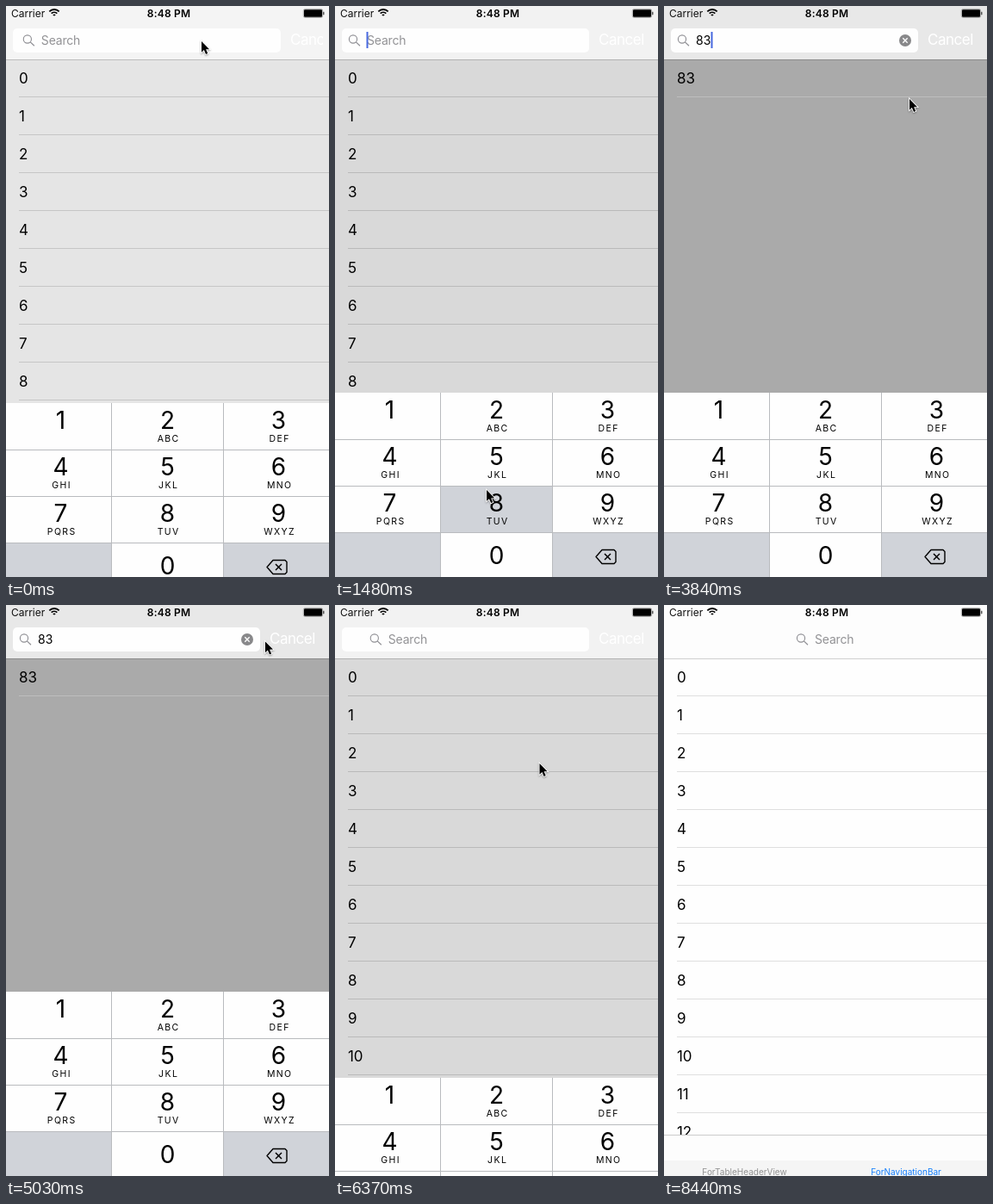
An HTML page with a canvas for the animation above (9.04 s loop, 375 by 663 pixels).

```html
<!DOCTYPE html>
<html lang="en">
<head>
<meta charset="utf-8">
<title>Number search</title>
<style>
html, body { margin: 0; width: 100%; height: 100%; overflow: hidden; background: #fff; }
canvas { display: block; width: 375px; height: 663px; }
</style>
</head>
<body>
<canvas id="stage"></canvas>
<script>
const W = 375, H = 663, LOOP = 9040, STEP = 150, ROW = 44, KEY = 54;
const canvas = document.getElementById('stage');
const ctx = canvas.getContext('2d');
const ratio = window.devicePixelRatio || 1;
canvas.width = W * ratio;
canvas.height = H * ratio;

// The pointer travels in bursts; between them the picture rests.
const home = { x: 227, y: 41 };
const moves = [
  { from: 150, to: 1030, x: 175, y: 563 },
  { from: 1330, to: 2360, x: 287.5, y: 466 },
  { from: 2810, to: 3540, x: 285, y: 108 },
  { from: 3840, to: 4440, x: 326, y: 43 },
  { from: 4740, to: 5030, x: 279.5, y: 42 },
  { from: 5330, to: 6070, x: 237.5, y: 184 },
  { from: 6370, to: 7260, x: 160, y: 214 },
  { from: 7710, to: 8440, x: 300, y: 690 }
];
const presses = [{ key: 8, at: 1480 }, { key: 3, at: 2210 }];
const focusAt = 150, clearAt = 5330;

const mix = (a, b, k) => a + (b - a) * k;
const gray = v => { const n = Math.round(v); return `rgb(${n},${n},${n})`; };

function ramp(t, start, duration) {
  const u = Math.min(1, Math.max(0, (t - start) / duration));
  return u * u * (3 - 2 * u);
}

function hold(time) {
  const move = moves.filter(m => m.from <= time).pop();
  if (!move) return 0;
  return Math.min(move.to, move.from + Math.floor((time - move.from) / STEP) * STEP);
}

function stateAt(t) {
  // Each part is already opening when the loop begins.
  const phase = (opened, closed, duration) => ramp(t, opened, 300) - ramp(t, closed, duration);
  const fade = phase(-186, 6370, 205);
  const slide = phase(-270, 6297, 270);
  const lift = phase(-256, 6150, 459);

  const typed = presses.filter(p => t >= p.at + STEP && t < clearAt);
  const query = typed.map(p => p.key).join('');
  const pressed = presses.find(p => t >= p.at && t < p.at + STEP);
  const edits = [focusAt, ...presses.map(p => p.at + STEP), clearAt];
  const lastEdit = edits.filter(at => at <= t).pop();
  const caret = lift === 1 && Math.floor((t - lastEdit) / 500) % 2 === 0;
  const list = query ? 170 : mix(254, 217, fade);
  return { t, fade, slide, lift, query, caret, list, pressed: pressed ? pressed.key : 0 };
}

function rect(x, y, w, h, color) {
  ctx.fillStyle = color;
  ctx.fillRect(x, y, w, h);
}

function text(str, x, y, size, color, { align = 'left', weight = 400, spacing = 0 } = {}) {
  ctx.font = `${weight} ${size}px Inter, sans-serif`;
  ctx.letterSpacing = spacing + 'px';
  ctx.textAlign = align;
  ctx.fillStyle = color;
  ctx.fillText(str, x, y);
}

function stroke(color, width) {
  ctx.strokeStyle = color;
  ctx.lineWidth = width;
  ctx.stroke();
}

function path(points, closed) {
  ctx.beginPath();
  points.forEach(([x, y]) => ctx.lineTo(x, y));
  if (closed) ctx.closePath();
}

function roundRect(x, y, w, h, r) {
  ctx.beginPath();
  ctx.roundRect(x, y, w, h, r);
}

function disc(x, y, r) {
  ctx.beginPath();
  ctx.arc(x, y, r, 0, Math.PI * 2);
}

function fill(color) {
  ctx.fillStyle = color;
  ctx.fill();
}

function cross(x, y, r, color, width) {
  for (const d of [-r, r]) {
    path([[x - r, y - d], [x + r, y + d]]);
    stroke(color, width);
  }
}

function drawStatus() {
  text('Carrier', 6, 12.5, 12, '#111');
  text('8:48 PM', 189, 12.5, 12, '#000', { align: 'center', weight: 600, spacing: 0.2 });
  for (const r of [1.5, 4.7, 8]) {
    ctx.beginPath();
    ctx.arc(56, 12, r, -Math.PI * 0.75, -Math.PI * 0.25);
    stroke('#000', 1.8);
  }
  roundRect(345.3, 3.6, 22.4, 9.8, 2);
  stroke('#777', 0.6);
  roundRect(346, 4.3, 21, 8.4, 1);
  fill('#000');
  rect(368.2, 6.8, 1.2, 3.4, '#333');
}

function drawList({ list, query }) {
  const rule = gray(query ? list + 20 : list - 31);
  rect(0, 63, W, H - 63, gray(list));
  const matches = Array.from({ length: 100 }, (_, n) => String(n)).filter(n => n.includes(query));
  matches.slice(0, 13).forEach((label, i) => {
    text(label, 15, 90 + i * ROW, 17, '#000', { spacing: -0.1 });
    rect(15, 105 + i * ROW, W - 15, 1, rule);
  });
}

function drawField(fade) {
  const shift = Math.round((1 - fade) * 75);
  roundRect(8, 26, 287 + shift, 28, 5);
  fill('#fefefe');
  ctx.save();
  ctx.beginPath();
  ctx.rect(0, 0, 368, 62);
  ctx.clip();
  text('Cancel', 306 + shift, 45, 17, '#fff', { spacing: -0.5 });
  ctx.restore();
}

function drawHeader({ fade, slide, list, query, caret }) {
  rect(0, 0, W, 62, gray(Math.max(mix(248, list, 0.2), list - 1)));
  rect(0, 62, W, 1, gray(list * 0.82));
  drawStatus();
  if (fade > 0.5) drawField(fade);

  const x = mix(154, 16, slide);
  disc(x + 5, 38.5, 4.6);
  stroke('#8e8e93', 1.1);
  path([[x + 8.4, 41.9], [x + 13, 46.3]]);
  stroke('#8e8e93', 1.2);

  if (query) {
    text(query, 37, 45, 14, '#000');
    disc(280, 40, 7);
    fill('#88888a');
    cross(280, 40, 2.7, '#fff', 1.3);
  } else {
    text('Search', x + 21, 45, 14, '#929295', { spacing: -0.2 });
  }
  if (caret) rect(36.5 + query.length * 9, 30, 2, 19, '#4768df');
}

function drawTabs({ fade }) {
  rect(0, 615, W, 48, gray(mix(253, 217, fade)));
  rect(0, 615, W, 1, '#cbcbcb');
  if (fade > 0) return;
  rect(0, 645, W, 18, '#f5f5f5');
  text('ForTableHeaderView', 93.5, 661.5, 10, '#929292', { align: 'center' });
  text('ForNavigationBar', 281, 661.5, 10, '#157efb', { align: 'center' });
}

function drawDelete(y) {
  ctx.lineJoin = 'round';
  path([[303, y], [310, y - 8], [324, y - 8], [326, y - 6], [326, y + 6], [324, y + 8], [310, y + 8]], true);
  stroke('#000', 1.4);
  cross(316.5, y, 3.5, '#000', 1.5);
}

function drawKeys({ fade, lift, pressed }) {
  if (lift === 0) return;
  const top = Math.round(mix(H, 449, lift));
  const edges = [-1, 122, 252, W], centers = [63.5, 187.5, 316.5];
  const shade = '#d0d3d9', line = '#b9bbbe';
  const shadeKey = i => {
    const col = i % 3;
    rect(edges[col] + 1, top + Math.floor(i / 3) * KEY, edges[col + 1] - edges[col] - 1, KEY, shade);
  };
  rect(0, top, W, H - top, fade > 0.5 ? '#fefefe' : 'rgba(255,255,255,.25)');
  if (pressed) shadeKey(pressed - 1);
  shadeKey(9);
  shadeKey(11);

  ['', 'ABC', 'DEF', 'GHI', 'JKL', 'MNO', 'PQRS', 'TUV', 'WXYZ'].forEach((letters, i) => {
    const x = centers[i % 3], y = top + Math.floor(i / 3) * KEY;
    text(String(i + 1), x, y + 30, 28, '#000', { align: 'center' });
    text(letters, x + 1.2, y + 45, 10.5, '#000', { align: 'center', spacing: 1.4 });
  });
  const last = top + 3 * KEY;
  text('0', centers[1], last + 37, 28, '#000', { align: 'center' });
  drawDelete(last + 28.5);

  for (let y = top + KEY; y <= last; y += KEY) rect(0, y, W, 1, line);
  for (const x of edges.slice(1, 3)) rect(x, top, 1, H - top, line);
}

function drawPointer({ t }) {
  let { x, y } = home;
  for (const m of moves) {
    const k = ramp(ramp(t, m.from, m.to - m.from), 0, 1);
    x = mix(x, m.x, k);
    y = mix(y, m.y, k);
  }
  ctx.save();
  ctx.translate(x, y);
  ctx.scale(0.88, 0.88);
  ctx.lineJoin = 'miter';
  path([[0, 0], [0, 14.5], [3.3, 11.5], [5.7, 17], [8.2, 16], [5.8, 10.6], [10.3, 10.4]], true);
  ctx.shadowColor = 'rgba(0,0,0,.35)';
  ctx.shadowBlur = 2 * ratio;
  ctx.shadowOffsetY = ratio;
  stroke('#fff', 2);
  ctx.shadowColor = 'transparent';
  fill('#000');
  ctx.restore();
}

function draw(time) {
  const state = stateAt(hold(time));
  ctx.setTransform(ratio, 0, 0, ratio, 0, 0);
  for (const layer of [drawList, drawHeader, drawTabs, drawKeys, drawPointer]) layer(state);
}

const began = performance.now();
function tick() {
  draw((performance.now() - began) % LOOP);
  requestAnimationFrame(tick);
}
tick();
</script>
</body>
</html>
```
